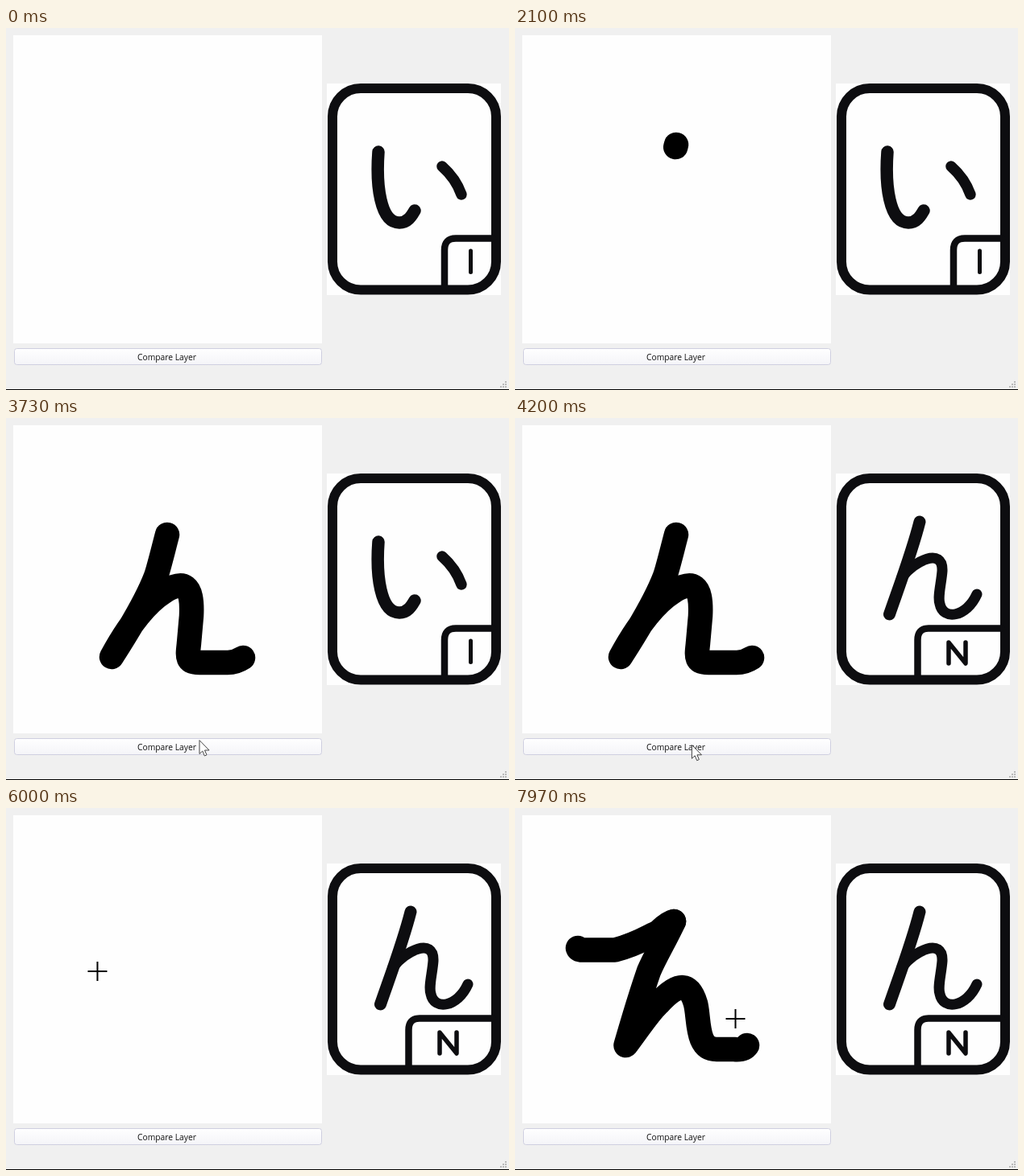
Write an HTML page that moves like this. It is 624x450 px and loops after 8000 ms.

```html
<!DOCTYPE html>
<html lang="en">
<head>
<meta charset="utf-8">
<title>Compare Layer</title>
<style>
  html, body { margin: 0; width: 100%; height: 100%; overflow: hidden; background: #f0f0f0; }
  svg { display: block; width: 624px; height: 450px; }
  text { font: 10.3px "Open Sans", "Noto Sans", sans-serif; fill: #111; }
  path, .line { fill: none; stroke-linecap: round; stroke-linejoin: round; }
  .line { stroke: #0d0d10; }
  .ink { stroke: #000; stroke-width: 30.5; }
  #cross { stroke: #fff; stroke-width: 2; stroke-linecap: butt; mix-blend-mode: difference; }
</style>
</head>
<body>
<svg viewBox="0 0 624 450">
  <defs>
    <linearGradient id="face" x2="0" y2="1">
      <stop stop-color="#fff"/>
      <stop offset="1" stop-color="#f4f4f8"/>
    </linearGradient>
  </defs>
  <rect width="624" height="450" fill="#f0f0f0"/>
  <rect y="449" width="624" height="1"/>
  <path d="M619 440h2m-5 3h2m1 0h2m-8 3h2m1 0h2m1 0h2" stroke="#b8b8b8" stroke-width="2" style="stroke-linecap: butt"/>
  <rect x="9" y="9" width="383" height="383" fill="#fefefe"/>
  <rect x="10.5" y="398.5" width="381" height="20" rx="3" fill="url(#face)" stroke="#cfcfe0"/>
  <text x="199.5" y="413" text-anchor="middle">Compare Layer</text>

  <rect x="398" y="69" width="216" height="263" fill="#fefefe"/>
  <rect class="line" x="405" y="75" width="203" height="250.5" rx="35" stroke-width="12"/>
  <g id="cardI" class="line">
    <path stroke-width="15.5" d="M462 154C459 195 464 242 488 242C498 242 503 234 507 227"/>
    <path stroke-width="13.5" d="M541 172Q558 187 565 207"/>
    <path stroke-width="8.5" d="M544 322V276Q544 261.5 558 261.5H604"/>
    <path stroke-width="5" d="M576.5 277V303.5"/>
  </g>
  <g id="cardN" class="line">
    <path stroke-width="15" d="M502 129C493 165 478 205 464.5 244"/>
    <path stroke-width="13" d="M480 198C495 178 531 160 530 190C529 205 524 222 527 231C531 252 560 248 573 219"/>
    <path stroke-width="8.5" d="M499.5 322V276Q499.5 261.5 513 261.5H604"/>
    <path stroke-width="5.5" d="M538 305V279L559 305V279"/>
  </g>

  <!-- The pointer follows these paths in turn; those of class ink leave a stroke. -->
  <g id="legs">
    <path data-time="30 600" d="M606 424C250 430 190 -20 200 146"/>
    <path data-time="2100 3440" class="ink" d="M200 145C194 168 190 185 186 197C178 218 160 252 131 297C150 262 172 231 196 216C220 201 232 206 230 246L227 280C225 298 224 304 240 304H275Q285 304 294 298"/>
    <path data-time="3440 3700" d="M294 298L240 401"/>
    <path data-time="3770 4570" d="M240 401Q215 415 207 396"/>
    <path data-time="4600 4930" d="M207 396L178.5 199"/>
    <path data-time="5200 5630" d="M178.5 199L130 190"/>
    <path data-time="5870 6250" d="M130 190Q90 230 78 174"/>
    <path data-time="6250 6670" class="ink" d="M78 174Q79 176.5 84 176.5H124C150 170 165 160 178 154Q190 142 197 141"/>
    <path data-time="6795 7825" class="ink" d="M197 141C187 163 174 184 166 203C156 232 147 262 137.5 295C152 276 166 254 178 243C204 214 217 219 224 243C229 262 224 300 250 300H272Q284 301 288 295"/>
    <path data-time="7830 7970" d="M288 295L273.5 262"/>
  </g>
  <path id="cross" d="M-12 0H12M0 -12V12"/>
  <path id="arrow" d="M0 0V16.5L3.8 13L6.3 19L9 17.8L6.5 12H11.7Z" style="fill: #fff" stroke="#444"/>
</svg>
<script>
const LOOP = 8000, COMPARE = 4200, CLEAR = 5230;
const $ = id => document.getElementById(id);
const show = (el, on) => el.setAttribute("visibility", on ? "visible" : "hidden");

const legs = [...$("legs").children].map(path => {
  const [from, to] = path.dataset.time.split(" ").map(Number);
  return { path, from, to, ink: path.matches(".ink"), length: path.getTotalLength() };
});

function travelled({ from, to, ink, length }, t) {
  const k = Math.min(1, Math.max(0, (t - from) / (to - from)));
  return length * (ink ? k : k * k * (3 - 2 * k));
}

function draw(t) {
  for (const leg of legs.filter(leg => leg.ink)) {
    show(leg.path, t >= leg.from && t < CLEAR === leg.from < CLEAR);
    leg.path.setAttribute("stroke-dasharray", `${Math.max(3, travelled(leg, t))} ${leg.length + 50}`);
  }
  show($("cardI"), t < COMPARE);
  show($("cardN"), t >= COMPARE);

  const leg = legs.findLast(leg => t >= leg.from) || legs[0];
  const { x, y } = leg.path.getPointAtLength(travelled(leg, t));
  const onCanvas = x < 392 && y < 392;
  const visible = t >= 30 && !(t >= 2100 && t < 2130);
  show($("cross"), visible && onCanvas);
  show($("arrow"), visible && !onCanvas);
  for (const id of ["cross", "arrow"]) $(id).setAttribute("transform", `translate(${x} ${y})`);
}

const start = performance.now();
(function tick() {
  draw((performance.now() - start) % LOOP);
  requestAnimationFrame(tick);
})();
</script>
</body>
</html>
```
